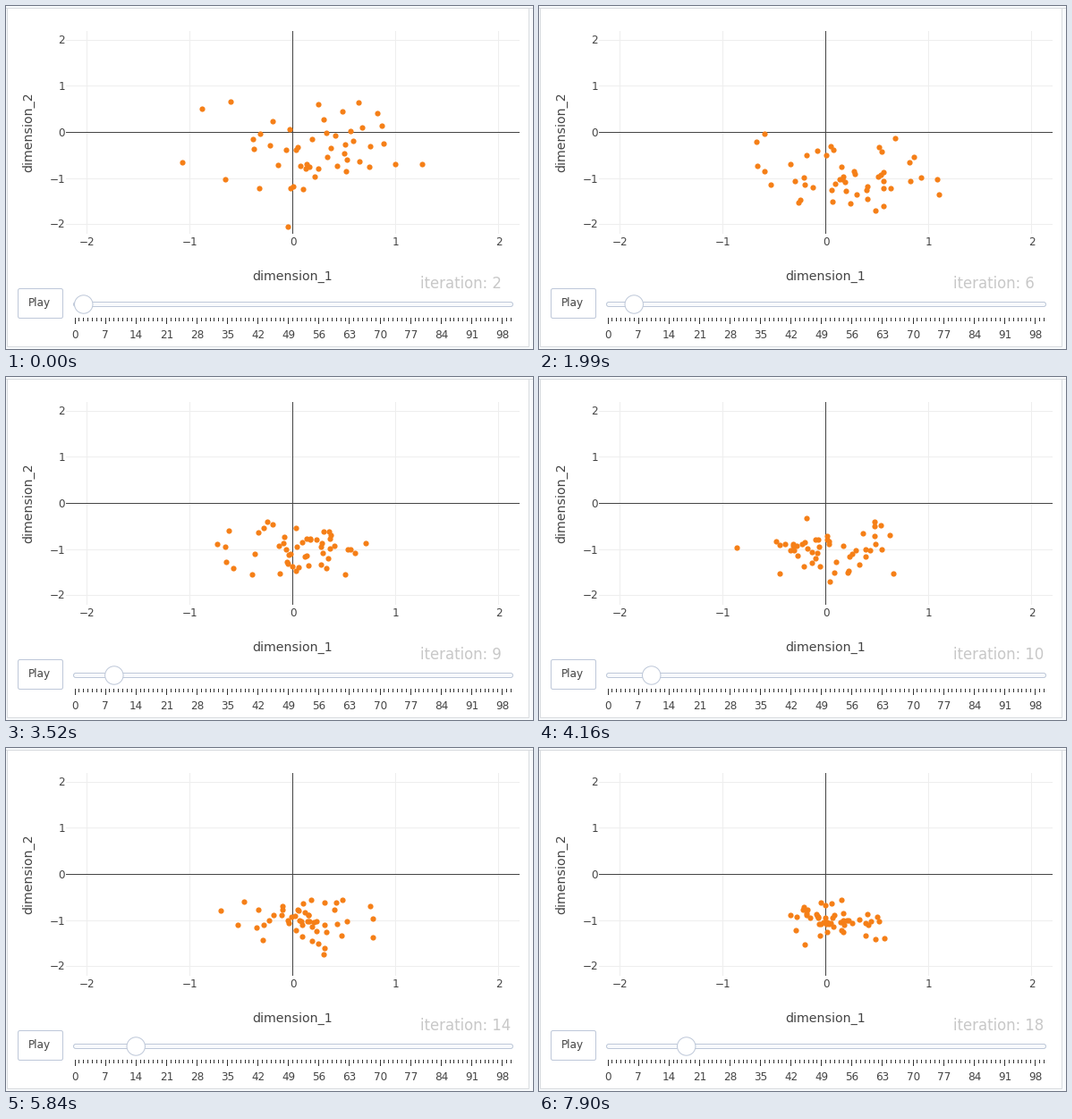
Recreate the animation shown at these times as a matplotlib script. Size 589 by 384 pixels, loop 8 s.

```python
import numpy as np
import matplotlib.pyplot as plt
from matplotlib.animation import FuncAnimation
from matplotlib.patches import Circle, FancyBboxPatch, Rectangle

W, H, DPI = 589, 384, 100
LOOP, INTERVAL = 8000, 100
STEP, LEAD = 500, 215          # ms per iteration, time already spent in the first
FIRST, LAST = 2, 18
COUNT = 50
DARK, RAIL, PALE, BORDER = "#444444", "#bec8d9", "#f8fafc", "#d8dbdf"

plt.rcParams["font.family"] = "DejaVu Sans"
fig = plt.figure(figsize=(W / DPI, H / DPI), dpi=DPI, facecolor=PALE)
ax = fig.add_axes([0, 0, 1, 1])
ax.set(xlim=(0, W), ylim=(H, 0))
ax.axis("off")


def pt(px):
    return px * 72 / DPI


def line(x0, y0, x1, y1, color, z=1):
    ax.plot([x0, x1], [y0, y1], color=color, lw=pt(1), zorder=z,
            solid_capstyle="butt", snap=False)


def label(x, y, text, size=12, color=DARK, ha="center", **kw):
    return ax.text(x, y, text, fontsize=pt(size), color=color, ha=ha,
                   va="baseline", **kw)


def rounded(x, y, w, h, r, face):
    ax.add_patch(FancyBboxPatch(
        (x, y), w, h, boxstyle=f"round,pad=0,rounding_size={r}",
        fc=face, ec=RAIL, lw=pt(1), zorder=2, snap=False))


def to_px(x, y):
    return np.column_stack([320.5 + 115.1 * x, 141.5 - 51.6 * y])


def slot(i):
    return 77 + 4.873 * i


def crisp(v):
    return np.floor(v) + 0.5


# Panel and chart
ax.add_patch(Rectangle((1.5, 2.5), 583, 379, fc="white", ec=BORDER,
                       lw=pt(1), zorder=0, snap=False))
line(0, 2.5, W, 2.5, BORDER, 0)
for v in range(-2, 3):
    gx, gy = crisp(to_px(v, v)[0])
    shade, z = (DARK, 2) if v == 0 else ("#eeeeee", 1)
    line(gx, 28, gx, 255, shade, z)
    line(67, gy, 574, gy, shade, z)
    name = str(v).replace("-", "\u2212")
    label(gx, 268, name)
    label(66, gy + 4, name, ha="right")
label(320.5, 307, "dimension_1", 14.15)
label(29, 141, "dimension_2", 14.15, rotation=90, rotation_mode="anchor")

# Button and slider
rounded(13.5, 316.5, 50, 33, 2, "white")
label(37.5, 336, "Play")
rounded(75.5, 331.5, 491, 5, 2.5, PALE)
for i in range(101):
    x = crisp(slot(i))
    line(x, 349, x, 356 if i % 7 == 0 else 353, "#333333")
    if i % 7 == 0:
        label(slot(i), 372, str(i))
knob = ax.add_patch(Circle((slot(FIRST), 334), 10.2, fc="white", ec=RAIL,
                           lw=pt(1), zorder=4))
counter = label(463.3, 316, "", 16.5, "#c8c8c8", ha="left")


def ease(u):
    return 4 * u ** 3 if u < 0.5 else 1 - 4 * (1 - u) ** 3


def swarm():
    """Positions per iteration: a cloud sinking to (0, -1), swaying, shrinking."""
    rng = np.random.default_rng(12)
    z = rng.normal(size=(COUNT, 2))
    pose = {}
    for it in range(FIRST - 1, LAST + 1):
        z = 0.45 * z + 0.89 * rng.normal(size=(COUNT, 2))
        z = (z - z.mean(0)) / z.std(0)
        age = it - FIRST + 1
        spread = 0.54 - 0.019 * age
        sway = 0.33 * np.exp(-it / 12) * np.cos(np.pi / 2 * (it - 9))
        x = sway + spread * z[:, 0]
        y = -1 + 0.75 * np.exp(-age / 1.5)
        y = y + (0.88 * spread + 0.25 * np.exp(-age)) * z[:, 1]
        top = 1.2 * np.exp(-age / 3) - 0.2
        pose[it] = to_px(x, top - abs(top - y))
    return pose


POSE = swarm()
dots = ax.scatter(*POSE[FIRST].T, s=pt(6.2) ** 2, c="#f57f17", lw=0, zorder=3)


def update(i):
    n, u = divmod((i * INTERVAL + LEAD) / STEP, 1)
    it = FIRST + int(n)
    a, b = POSE[it - 1], POSE[it]
    dots.set_offsets(a + (b - a) * ease(u))
    knob.center = (slot(it), 334)
    counter.set_text(f"iteration: {it}")
    return dots, knob, counter


anim = FuncAnimation(fig, update, frames=LOOP // INTERVAL, interval=INTERVAL,
                     repeat=True, repeat_delay=0, blit=False)
plt.show()
```
